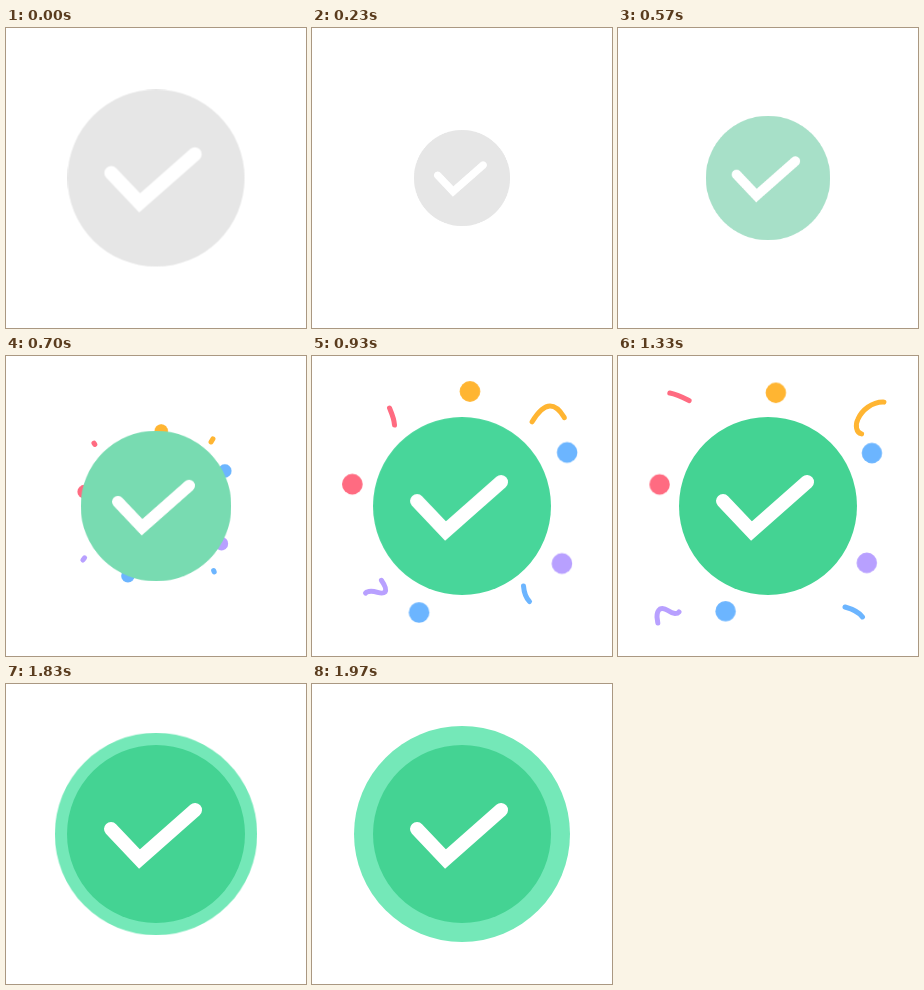
Animation, 300 px wide and 300 px high, one loop 2.03 s. Source, as an HTML page without scripts:

```html
<!DOCTYPE html>
<html lang="en">
<head>
<meta charset="utf-8">
<title>Success check</title>
<style>
  html, body { margin: 0; width: 100%; height: 100%; overflow: hidden; background: #fff; }
  svg { display: block; width: 100%; height: 100%; }

  .badge, .disc, .dots, .ring, .streaks path { animation: 2030ms linear infinite; }
  .badge, .dots, .ring { transform-origin: 150px 150px; }
  .badge { animation-name: badge; }
  .disc { animation-name: tint; }
  .dots { animation-name: burst; }
  .ring { animation-name: ring; fill: #74e8b8; }
  .check { fill: none; stroke: #fff; stroke-width: 14; stroke-linecap: round; stroke-linejoin: miter; }

  .red { --c: #ff6b81; }
  .gold { --c: #ffb532; }
  .blue { --c: #6cb5ff; }
  .violet { --c: #b8a0ff; }
  .dots circle { fill: var(--c); }

  /* --s1..3: where the visible piece begins, --l1..3: how long it is */
  .streaks path {
    fill: none; stroke: var(--c); stroke-width: 5; stroke-linecap: round;
    animation-name: streak;
  }
  .streaks .red    { --s1: -22.5px; --l1: 17.8px; --s2: -50.4px; --l2: 20.9px; --s3: -74.5px; --l3: 3px; }
  .streaks .gold   { --s1: -27.3px; --l1: 44px;   --s2: -93.5px; --l2: 50.3px; --s3: -153.3px; --l3: 6px; }
  .streaks .violet { --s1: -27.5px; --l1: 33.2px; --s2: -83.2px; --l2: 35.8px; --s3: -124.5px; --l3: 4px; }
  .streaks .blue   { --s1: -17.6px; --l1: 16.9px; --s2: -45.5px; --l2: 20.5px; --s3: -69.3px; --l3: 3px; }

  @keyframes badge {
    0% { transform: scale(1); animation-timing-function: cubic-bezier(.333, 0, .667, 1); }
    13.793%, 14.286% { transform: scale(.5); animation-timing-function: cubic-bezier(.333, 0, .667, 1); }
    46.305%, 100% { transform: scale(1); }
  }
  @keyframes tint {
    0% { fill: #e6e6e6; }
    14.286% { fill: #e6e6e6; animation-timing-function: cubic-bezier(.333, 0, .667, 1); }
    46.305% { fill: #48d69a; }
    65.517%, 100% { fill: #44d393; }
  }
  @keyframes burst {
    0% { transform: scale(0); }
    14.778% { transform: scale(0); animation-timing-function: cubic-bezier(.333, 0, .667, 1); }
    47.635% { transform: scale(1); }
    64.039% { transform: scale(1); animation-timing-function: cubic-bezier(.333, 0, .667, 1); }
    82.266%, 100% { transform: scale(0); }
  }
  @keyframes streak {
    0%, 33.49% { opacity: 0; stroke-dasharray: 0px 400px; stroke-dashoffset: 0px; }
    33.5% { opacity: 1; stroke-dasharray: 0px 400px; stroke-dashoffset: 0px; }
    45.813% { stroke-dasharray: var(--l1) 400px; stroke-dashoffset: var(--s1); }
    65.517% { stroke-dasharray: var(--l2) 400px; stroke-dashoffset: var(--s2); }
    78.818% { stroke-dasharray: var(--l3) 400px; stroke-dashoffset: var(--s3); }
    80% { opacity: 1; stroke-dasharray: var(--l3) 400px; stroke-dashoffset: var(--s3); }
    80.01%, 100% { opacity: 0; stroke-dasharray: var(--l3) 400px; stroke-dashoffset: var(--s3); }
  }
  @keyframes ring {
    0%, 79.5% { transform: scale(0); }
    79.51% { transform: scale(.815); animation-timing-function: cubic-bezier(.333, 0, .667, 1); }
    97.044%, 100% { transform: scale(1); }
  }
</style>
</head>
<body>
<svg viewBox="0 0 300 300">
  <g class="streaks">
    <path class="red" d="M90 90C84 82 83 76 82.5 69S80 58 77.5 52C76 48 74 45.5 71 44.5C64 41 58 38 51.5 37L45.3 36.4"/>
    <path class="gold" d="M204 88C208 80 214 73 220 66C226 56 232 50 238 50C245 50 249 56 252 61C256 70 252 78 244 78C238 77 237 69 240 63C244 54 254 46 265 46L280.5 48.5"/>
    <path class="violet" d="M80 200C74 208 66 216 69.5 224.5C72 228 75 233 73 236C69 240 63 233 55 236C48 240 57 245 61.5 251.5C62.5 256 60 257.5 57 257.5C50 257 48 250 42 253C39 255 39 258 39 261L40.3 270.5"/>
    <path class="blue" d="M207 213C210 220 211 225 211.5 230C212 236 214 242 217.5 245.5C220 248 223 249.5 227 251C234 253 241 256 244.5 261C246 263 246 265 244.7 267"/>
  </g>
  <g class="dots">
    <circle class="red" cx="39.4" cy="128" r="10.4"/>
    <circle class="gold" cx="158" cy="34.5" r="10.4"/>
    <circle class="blue" cx="256" cy="96" r="10.4"/>
    <circle class="violet" cx="250.8" cy="208" r="10.4"/>
    <circle class="blue" cx="106.7" cy="257.4" r="10.4"/>
  </g>
  <circle class="ring" cx="150" cy="150" r="108"/>
  <g class="badge">
    <circle class="disc" cx="150" cy="150" r="89"/>
    <path class="check" d="M105 145L133.5 175L189 126"/>
  </g>
</svg>
</body>
</html>
```
